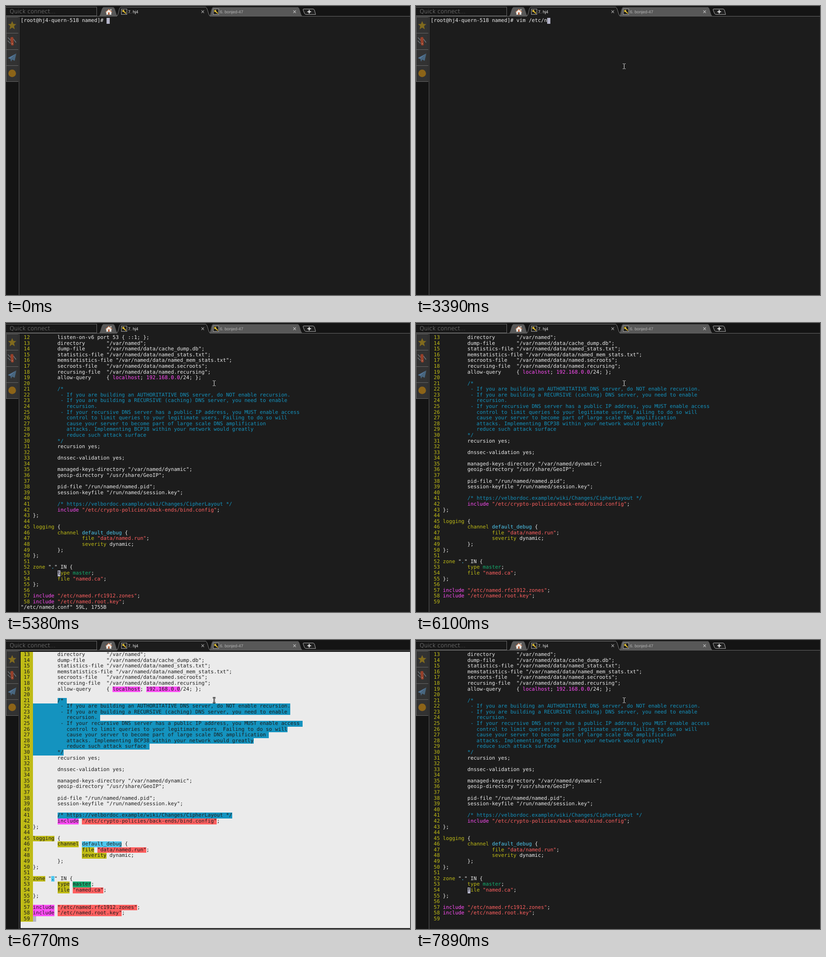
An HTML page for the animation above (8000 ms loop, 884 by 633 pixels).

```html
<!DOCTYPE html>
<html lang="en">
<head>
<meta charset="utf-8">
<title>Terminal session</title>
<style>
html, body { margin: 0; width: 100%; height: 100%; overflow: hidden; background: #141414; }
#stage { position: relative; width: 884px; height: 633px; overflow: hidden; background: #141414; }
svg { position: absolute; left: 0; top: 0; }
#back { position: absolute; left: 29px; top: 23px; width: 855px; height: 610px; background: #1c1c1c; }
#term {
  --row: 12.585px; --col: 6.713px; --bg: #1c1c1c;
  position: absolute; left: 32px; top: 26px; width: 852px; height: 605px; overflow: hidden;
  font: 11.15px/var(--row) "DejaVu Sans Mono", monospace;
  text-rendering: geometricPrecision; white-space: pre;
  color: #ececec; background: var(--bg);
}
#term.flash { color: #1c1c1c; background: #ebebeb; }
.line { position: absolute; left: 0; top: 0; height: var(--row); }
i { display: inline-block; height: var(--row); vertical-align: top; font-style: normal; color: var(--c); }
.flash i { color: #1c1c1c; background: var(--c); }
.y { --c: #bfbb16; } .c { --c: #1493bf; } .m { --c: #ff4df6; }
.r { --c: #ff6060; } .k { --c: #4ec8f0; } .g { --c: #14ab6e; }
#cursor { position: absolute; width: var(--col); height: var(--row); background: #b4b4c8; color: #1c1c1c; }
.ui { font-family: "Liberation Sans", Arial, sans-serif; font-size: 9.2px; text-rendering: geometricPrecision; }
.quick { font: 200 12.4px "DejaVu Sans", sans-serif; text-rendering: geometricPrecision; }
</style>
</head>
<body>
<div id="stage">
  <div id="back"></div>
  <div id="term">
    <div id="shell" class="line"></div>
    <div id="doc"></div>
    <div id="status" class="line">"/etc/named.conf" 59L, 1755B</div>
    <div id="cursor"></div>
  </div>
  <svg width="884" height="633" fill="none">
    <defs>
      <g id="key">
        <rect x=".5" y=".5" width="12" height="12" fill="#222" stroke="#a8a8a8"/>
        <path d="M5 5L10.5 10.5" stroke="#e8c02c" stroke-width="2"/>
        <circle cx="4.4" cy="4.6" r="2.3" fill="#f0cc3c"/>
        <circle cx="3.7" cy="3.9" r=".7" fill="#222"/>
      </g>
      <path id="close" d="M-2.8 -2.8L2.8 2.8M2.8 -2.8L-2.8 2.8" stroke-width="1.1"/>
    </defs>

    <path d="M0 22.5H884" stroke="#686868"/>
    <path d="M28.5 22V633" stroke="#5c5c5c"/>
    <rect x="-.5" y="2.5" width="199" height="19" fill="#181818" stroke="#6c6c6c"/>
    <text class="quick" x="8" y="16" fill="#a0a0a0">Quick connect...</text>

    <path d="M203 22.5C208 20 208 5 213 2.5H235C240 5 240 20 245 22.5Z" fill="#585858"/>
    <path d="M444 22.5C449 20 448 5 453 2.5H639C644 5 644 20 649 22.5Z" fill="#585858"/>
    <path d="M242 23C247 20 246 5 251 2.5H437C442 5 442 20 447 23Z" fill="#1c1c1c"/>
    <path d="M242 22.5C247 20 246 5 251 2.5H437C442 5 442 20 447 22.5" stroke="#808080"/>
    <path d="M218 13.5L225 7L232 13.5L230.5 14.5V19H219.5V14.5Z" fill="#f0ece6"/>
    <path d="M218 13.5L225 7L232 13.5" stroke="#c8764c" stroke-width="1.2"/>
    <rect x="223.5" y="14" width="3" height="5" fill="#b4572e"/>
    <rect x="228.5" y="7" width="2" height="3" fill="#f0ece6"/>

    <use href="#key" x="252" y="6"/>
    <use href="#key" x="453" y="6"/>
    <text class="ui" x="267" y="16" fill="#f0f0f0">7. hj4</text>
    <text class="ui" x="468" y="16" fill="#b4b4b4">6. bonjed-47</text>
    <use href="#close" x="430.5" y="12.5" stroke="#b4b4b4"/>
    <use href="#close" x="631.5" y="12.5" stroke="#c8c8c8"/>
    <path d="M652 6.5H671Q674 6.5 675 9L677.5 18.5H657Q654 18.5 653 16L650 8Q650 6.5 652 6.5Z" fill="#202020" stroke="#b0b0b0"/>
    <path d="M659.5 12.5H667.5M663.5 8.5V16.5" stroke="#f0f0f0" stroke-width="2"/>

    <rect y="24" width="27" height="142" fill="#323232"/>
    <path d="M.5 24V166M0 24.5H27M0 59.5H27M0 95.5H27M0 130.5H27M0 165.5H27" stroke="#686868"/>
    <path d="M13.5 33L16.2 39.3L22.5 39.8L17.6 44L19.2 51L13.5 47.2L7.8 51L9.4 44L4.5 39.8L10.8 39.3Z" fill="#806a1e"/>
    <path d="M4 69L11 76M3.5 76L10 82M16 72L22 80" stroke="#707478" stroke-width="1.6"/>
    <path d="M9.5 70Q12.5 66 16 69L17 85Q14 88 11 85Z" fill="#96402a"/>
    <path d="M13.5 81V84" stroke="#c8a090"/>
    <path d="M22.5 104L4 114L9.5 116Z" fill="#54789a"/>
    <path d="M22.5 104L9.5 116L11 122L13.5 117.5L19 120Z" fill="#48667f"/>
    <circle cx="13.5" cy="147.5" r="8.3" fill="#8c6418"/>

    <g id="mouse">
      <path d="M-3 -5.5H3M0 -5.5V5.5M-3 5.5H3" stroke="#1c1c1c" stroke-width="3"/>
      <path d="M-3 -5.5H-1L0 -4.5L1 -5.5H3M0 -4.5V4.5M-3 5.5H-1L0 4.5L1 5.5H3" stroke="#f0f0f0"/>
    </g>
  </svg>
</div>
<script>
const LOOP = 8000, ROW = 12.585, COL = 6.713, FIRST = 12;
const PROMPT = '[root@hj4-quern-518 named]# ';
const COMMAND = 'vim /etc/named.conf ';
const config = `        listen-on-v6 port 53 { ::1; };
        directory       "/var/named";
        dump-file       "/var/named/data/cache_dump.db";
        statistics-file "/var/named/data/named_stats.txt";
        memstatistics-file "/var/named/data/named_mem_stats.txt";
        secroots-file   "/var/named/data/named.secroots";
        recursing-file  "/var/named/data/named.recursing";
        allow-query     { localhost; 192.168.0.0/24; };

        /*\x20
         - If you are building an AUTHORITATIVE DNS server, do NOT enable recursion.
         - If you are building a RECURSIVE (caching) DNS server, you need to enable\x20
           recursion.\x20
         - If your recursive DNS server has a public IP address, you MUST enable access\x20
           control to limit queries to your legitimate users. Failing to do so will
           cause your server to become part of large scale DNS amplification\x20
           attacks. Implementing BCP38 within your network would greatly
           reduce such attack surface\x20
        */
        recursion yes;

        dnssec-validation yes;

        managed-keys-directory "/var/named/dynamic";
        geoip-directory "/usr/share/GeoIP";

        pid-file "/run/named/named.pid";
        session-keyfile "/run/named/session.key";

        /* https://velbordoc.example/wiki/Changes/CipherLayout */
        include "/etc/crypto-policies/back-ends/bind.config";
};

logging {
        channel default_debug {
                file "data/named.run";
                severity dynamic;
        };
};

zone "." IN {
        type master;
        file "named.ca";
};

include "/etc/named.rfc1912.zones";
include "/etc/named.root.key";
`.split('\n');

// Each table row: start time, then the values that hold from there on.
const typed = [[0, 0], [1670, 3], [1810, 4], [2200, 5], [2330, 7], [2460, 8], [2590, 9],
  [3390, 10], [3460, 11], [3590, 12], [3660, 13], [3860, 14], [4190, 15],
  [4390, 16], [4520, 17], [4720, 18], [4790, 20]];
const caret = [[5380, 53, 12], [6100, 0, 0], [6170, 59, 4], [7300, 58, 12],
  [7500, 57, 12], [7630, 56, 4], [7760, 55, 5], [7890, 54, 12]];
const bell = [[0, false], [6630, true], [6700, false], [6770, true], [6900, false]];
const pointer = [[200, 592, 217], [270, 548, 186], [330, 503, 153],
  [400, 471, 135], [470, 459, 129], [600, 456, 132]];
const OPEN = 5380, SCROLL = 6100;

const $ = id => document.getElementById(id);
const at = (table, t) => table.findLast(row => row[0] <= t);
const tag = (cls, text) => `<i class=${cls}>${text}</i>`;
const show = (el, on) => { el.style.display = on ? '' : 'none'; };

function paint(text, n) {
  if (n === 21 || n === 41) return text.replace(/\/\*.*/, m => tag('c', m));
  if (n > 21 && n <= 30) return tag('c', text);
  return text
    .replace(/^( *)(include|file) (".*")/, (m, pad, word, path) =>
      pad + tag(word === 'include' ? 'm' : 'y', word) + ' ' + tag('r', path))
    .replace(/^( *)(logging|channel|severity|zone|type)\b/, (m, pad, word) => pad + tag('y', word))
    .replace(/localhost|192\.168\.0\.0/g, m => tag('m', m))
    .replace('default_debug', m => tag('k', m))
    .replace('master', m => tag('g', m))
    .replace('"."', `"${tag('k', '.')}"`);
}

const lines = config.map((text, i) => {
  const el = document.createElement('div');
  el.className = 'line';
  el.innerHTML = tag('y', ` ${FIRST + i} `) + paint(text, FIRST + i);
  $('doc').append(el);
  return el;
});
$('status').style.top = 47 * ROW + 'px';

function placeCursor(row, col, char) {
  const cursor = $('cursor');
  cursor.style.left = col * COL + 'px';
  cursor.style.top = row * ROW + 'px';
  cursor.textContent = char;
}

function draw(t) {
  const editing = t >= OPEN, scrolled = t >= SCROLL;
  const top = scrolled ? FIRST + 1 : FIRST;
  show($('shell'), !editing);
  show($('doc'), editing);
  show($('status'), editing && !scrolled);
  show($('cursor'), true);
  $('term').classList.toggle('flash', at(bell, t)[1]);

  if (editing) {
    lines.forEach((el, i) => {
      const row = FIRST + i - top;
      el.style.top = row * ROW + 'px';
      show(el, row >= 0 && row < 47);
    });
    const [, line, col] = at(caret, t);
    if (line) placeCursor(line - top, col, config[line - FIRST][col - 4] || ' ');
    else show($('cursor'), false);
  } else {
    const text = PROMPT + COMMAND.slice(0, at(typed, t)[1]);
    $('shell').textContent = text;
    placeCursor(0, text.length, ' ');
  }

  const spot = at(pointer, t);
  show($('mouse'), spot);
  if (spot) $('mouse').setAttribute('transform', `translate(${spot[1] - .5} ${spot[2]})`);
}

const cuts = [...typed, ...caret, ...bell, ...pointer].map(row => row[0]).sort((a, b) => a - b);
const start = performance.now();
let shown = -1;
function tick() {
  const t = (performance.now() - start) % LOOP;
  const cut = cuts.findLast(c => c <= t);
  if (cut !== shown) draw(shown = cut);
  requestAnimationFrame(tick);
}
tick();
</script>
</body>
</html>
```
